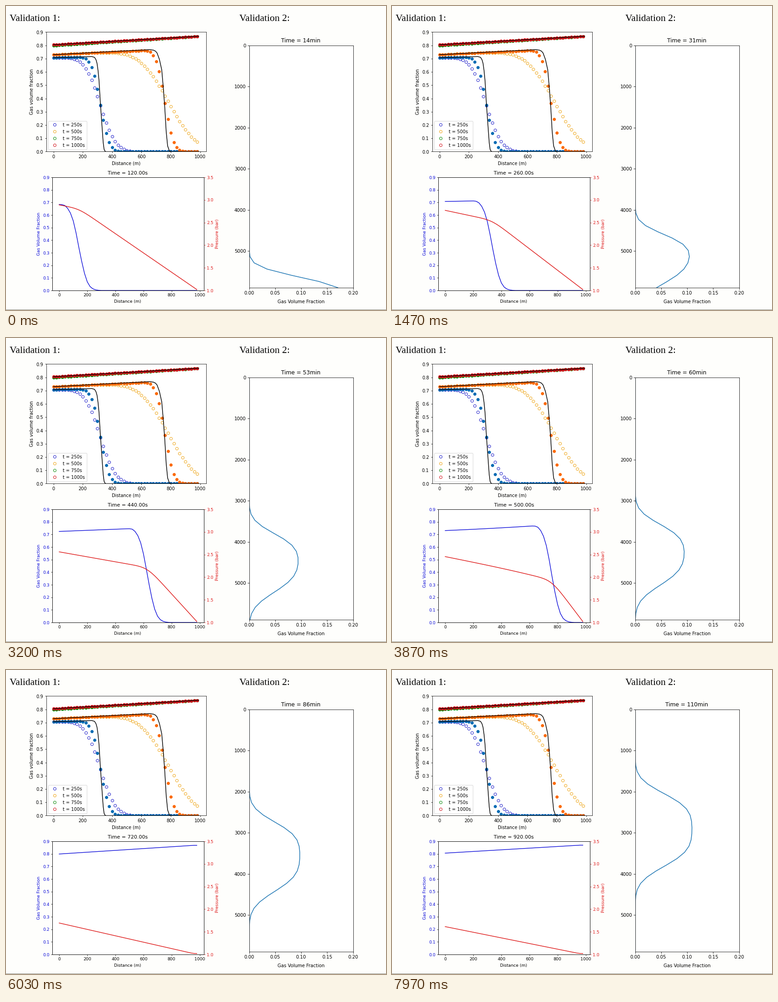
A matplotlib script for the animation above (8 s loop, 837 by 669 pixels).

```python
import math

import matplotlib.pyplot as plt
import numpy as np
from matplotlib.animation import FuncAnimation
from matplotlib.patches import Rectangle

W, H, DPI = 837, 669, 100
INTERVAL, FRAMES = 50, 160
BLUE, RED = "#0808d8", "#dd1212"

plt.rcParams["font.family"] = "DejaVu Sans"
# The small surplus keeps float rounding from losing a pixel
fig = plt.figure(figsize=((W + 0.01) / DPI, (H + 0.01) / DPI), dpi=DPI, facecolor="#fefefc")


def panel(left, top, right, bottom, scale, font_px):
    ax = fig.add_axes([left / W, 1 - bottom / H, (right - left) / W, (bottom - top) / H])
    style_axes(ax, scale, font_px)
    return ax


def style_axes(ax, scale, font_px):
    ax.tick_params(labelsize=font_px * 0.72, length=3.5 * scale, pad=3.5 * scale, width=0.8 * scale)
    for spine in ax.spines.values():
        spine.set_linewidth(0.8 * scale)


def label(x, y, text, px, ha="center", **kw):
    return fig.text(x / W, 1 - y / H, text, fontsize=px * 0.72, ha=ha, va="baseline",
                    rotation_mode="anchor", **kw)


normal_cdf = np.vectorize(lambda z: 0.5 * (1 + math.erf(z / math.sqrt(2))))

# Shared shape of the moving gas front, as a fraction of the plateau behind it
FRONT_D = np.array([-130, -110, -100, -80, -60, -40, -20, 0, 20, 40, 60, 80, 100, 120, 140, 160])
FRONT_R = [1, .995, .988, .955, .9, .81, .67, .5, .34, .2, .1, .045, .019, .007, .002, 0]


def front(x, position):
    return np.interp(x - position, FRONT_D, FRONT_R)


cells = np.arange(0, 981, 20.0)

# ---- Static comparison plot
S1 = 0.71
ax1 = panel(88.5, 57.5, 440.5, 320.5, S1, 9.9)
ax1.set(xlim=(-49.5, 1039.5), ylim=(0, 0.9), xticks=range(0, 1001, 200), yticks=np.arange(10) / 10)


def dots(values, edge, face="none", **kw):
    ax1.plot(cells, values, "o", ms=6 * S1, mew=S1, mec=edge, mfc=face, **kw)


early = 0.708 + 1e-5 * cells
late = 0.73 + 5e-5 * cells
green_dots = 0.799 + 7.0e-5 * cells
red_dots = 0.805 + 6.4e-5 * cells

dots(early * normal_cdf((318 - cells) / 83), "#1818c8", label="t = 250s")
dots(late * normal_cdf((778 - cells) / 153), "#eda414", label="t = 500s")
dots(green_dots, "#0a8a0a", label="t = 750s")
dots(red_dots, "#d01018", label="t = 1000s")
dots(early * front(cells, 319), "#0a6cb4", "#0a6cb4")
dots(late * front(cells, 757), "#fb6a0a", "#fb6a0a")
dots(green_dots, "#0a8a0a", "#0a8a0a")
dots(red_dots, "#d01018", "#e01420")

exact_lines = [
    ([0, 200, 262, 280, 290, 297, 304, 311, 320, 326, 333, 339, 345, 351, 358, 990],
     [.708, .714, .716, .71, .692, .665, .61, .53, .36, .27, .16, .07, .018, .004, 0, 0]),
    ([0, 400, 640, 660, 682, 695, 706, 722, 738, 750, 759, 768, 778, 790, 805, 990],
     [.73, .754, .767, .768, .764, .757, .743, .695, .616, .463, .326, .155, .043, .006, 0, 0]),
    ([0, 990], [.805, .869]),
]
for xs, ys in exact_lines:
    ax1.plot(xs, ys, "k", lw=1.5 * S1, zorder=3)
legend = ax1.legend(loc="lower left", fontsize=9.9 * 0.72)
legend.get_frame().set_linewidth(S1)
label(60, 188.5, "Gas volume fraction", 9.95, rotation=90)
label(264.5, 349.5, "Distance (m)", 9.8)

# ---- Gas fraction and pressure along the pipe
S2 = 0.667
ax2 = panel(102, 377, 435.5, 626, S2, 9.25)
ax2.set(xlim=(-49, 1029), ylim=(0, 0.9), xticks=range(0, 1001, 200), yticks=np.arange(10) / 10)
axp = ax2.twinx()
style_axes(axp, S2, 9.25)
axp.set(ylim=(1, 3.5), yticks=np.arange(1, 3.6, 0.5))
ax2.tick_params(axis="y", labelcolor=BLUE, color="black")
axp.tick_params(axis="y", labelcolor=RED, color=RED)
gas_line, = ax2.plot([], [], color=BLUE, lw=1.5 * S2)
pressure_line, = axp.plot([], [], color=RED, lw=1.5 * S2)
label(74.5, 501.5, "Gas Volume Fraction", 9.25, rotation=90, color=BLUE)
label(467.5, 501.5, "Pressure (bar)", 9.25, rotation=90, color=RED)
label(268, 653.3, "Distance (m)", 9.25)
pipe_title = label(268.5, 371, "", 11.15)

# ---- Gas fraction along the well
S3 = 0.73
ax3 = panel(535.5, 87, 764.5, 620, S3, 10.2)
ax3.set(xlim=(0, 0.2), ylim=(5890, 0), xticks=np.arange(5) * 0.05, yticks=range(0, 5001, 1000))
nodes = np.arange(40)
well_line, = ax3.plot([], [], color="tab:blue", lw=1.5 * S3)
label(649.5, 653.8, "Gas Volume Fraction", 10.15)
well_title = label(649.5, 79.5, "", 12.2)

for left, name in ((7.5, "Validation 1:"), (514, "Validation 2:")):
    label(left, 32.5, name, 21.6, ha="left", family="Liberation Serif")
fig.add_artist(Rectangle((0, 0), 1, 1 / H, color="#8c8c80", lw=0, transform=fig.transFigure))


def pipe_gas(t):
    base = np.interp(t, [120, 260, 440, 500, 580, 620, 660, 720, 840, 920],
                     [.684, .708, .724, .731, .749, .778, .791, .799, .805, .806])
    slope = np.interp(t, [120, 260, 440, 580, 640, 720, 840, 920],
                      [0, 2e-5, 4.4e-5, 5e-5, 6.5e-5, 7.2e-5, 6.7e-5, 6.6e-5])
    bend = np.interp(t, [440, 580, 640, 700], [0, 4.6e-8, 1e-8, 0])
    position = np.interp(t, [120, 250, 260, 440, 500, 540, 560, 580, 600, 620],
                         [140, 319, 334, 628, 757, 865, 928, 995, 1065, 1150])
    x = np.minimum(cells, 960)
    squeezed = np.minimum(cells, 950 + 0.1 * (cells - 950))
    ratio = front(squeezed, position)
    return (base + slope * x + bend * x ** 2) * ratio, ratio


def pipe_pressure(t, ratio):
    inlet = np.interp(t, [120, 260, 440, 520, 580, 600, 620, 640, 660, 690, 720, 840, 920],
                      [2.89, 2.77, 2.56, 2.42, 2.25, 2.08, 1.94, 1.84, 1.77, 1.72, 1.695, 1.63, 1.615])
    outlet = np.interp(t, [540, 580, 600, 640, 680], [1.02, 1.14, 1.13, 1.05, 1.02])
    ahead = np.interp(t, [120, 260, 440, 500, 580], [.00213, .00237, .0034, .0041, .005])
    curve = np.interp(t, [440, 580, 640, 700], [0, 1.2, .2, 0])
    mid = (cells[1:] + cells[:-1]) / 2
    wet = (ratio[1:] + ratio[:-1]) / 2
    behind_part = wet * (1 + curve * (mid / 980) ** 2)
    ahead_part = ahead * (1 - wet)
    if t >= 560:
        behind_part[-2:] *= [.6, .2]
        ahead_part[-2:] *= [.6, .2]
    scale = (inlet - outlet - 20 * ahead_part.sum()) / (20 * behind_part.sum())
    drops = 20 * (scale * behind_part + ahead_part)
    return inlet - np.concatenate([[0], np.cumsum(drops)])


def well_gas(n):
    keys = [6, 13, 22, 29, 36, 42, 46]
    top = np.interp(n, keys, [37.25, 30.35, 25.1, 21.65, 18.1, 15.35, 13.5])
    bottom = np.interp(n, keys, [46, 38.4, 34.6, 31.95, 29.3, 26.85, 25.3])
    height = np.interp(n, keys, [.19, .107, .0957, .0952, .098, .1045, .1097])
    spread = np.interp(n, [6, 13, 22, 46], [1.37, 1.52, 1.76, 1.95])
    return height * normal_cdf((nodes - top) / spread) * normal_cdf((bottom - nodes) / 2.07)


def step_at(ms):
    """Simulation step: the first two are uneven, the rest last 200 ms."""
    if ms < 350:
        return 6 + (ms >= 50)
    return 6 + (ms + 50) // 200


def update(frame):
    n = step_at(frame * INTERVAL)
    t = 20 * n
    gas, ratio = pipe_gas(t)
    gas_line.set_data(cells, gas)
    pressure_line.set_data(cells, pipe_pressure(t, ratio))
    well_line.set_data(well_gas(n), nodes * 151)
    pipe_title.set_text(f"Time = {t:.2f}s")
    well_title.set_text(f"Time = {2.4 * n:.0f}min")
    return gas_line, pressure_line, well_line, pipe_title, well_title


anim = FuncAnimation(fig, update, frames=FRAMES, interval=INTERVAL, repeat=True,
                     repeat_delay=0, blit=False)
plt.show()
```
